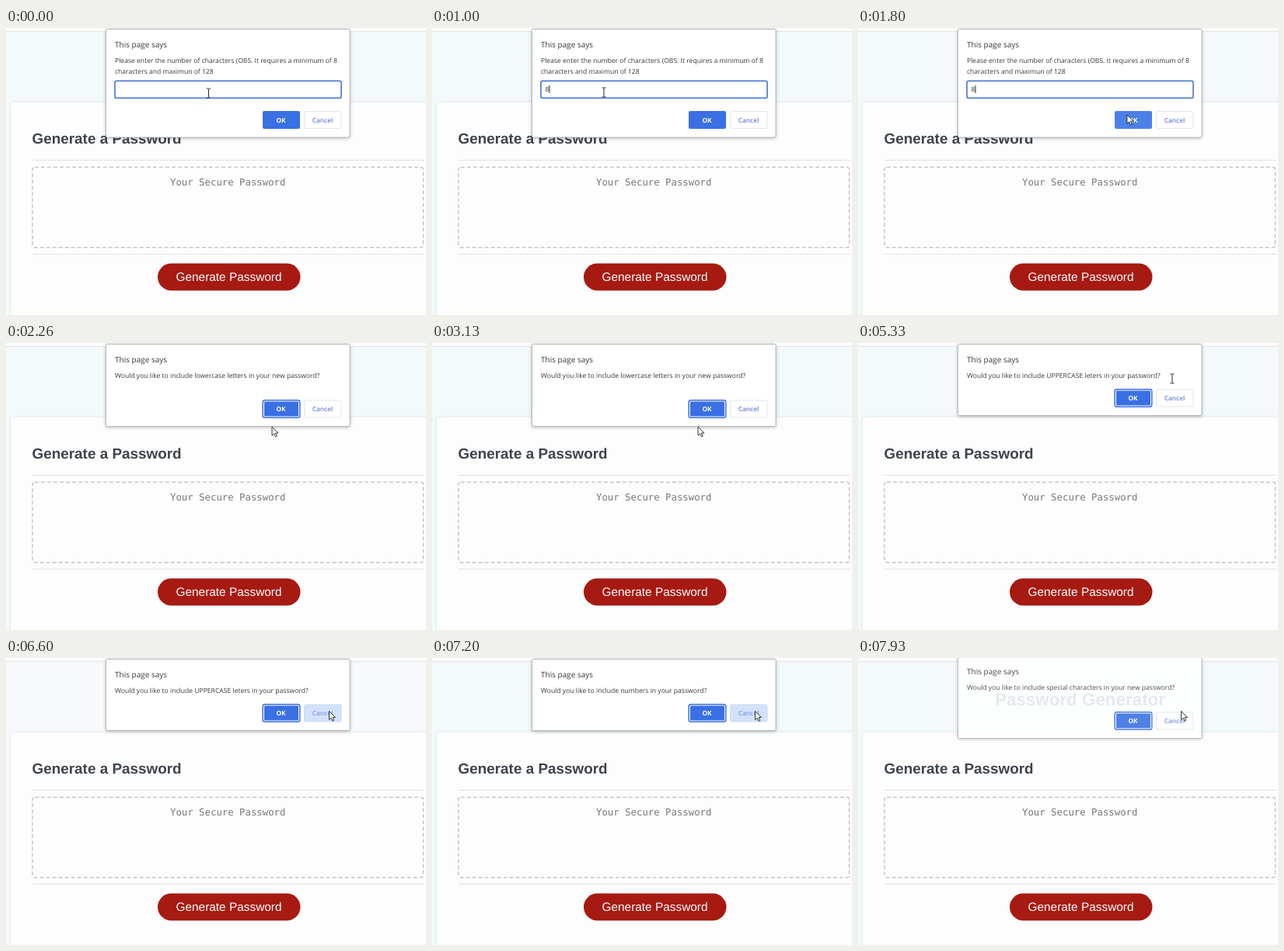
Recreate the animation shown at these times as an HTML page. Size 540x370 px, loop 8 s.

```html
<!DOCTYPE html>
<html lang="en">
<head>
<meta charset="utf-8">
<title>Password generator</title>
<style>
  html, body { margin: 0; width: 100%; height: 100%; overflow: hidden; }
  svg { display: block; width: 540px; height: 370px; font-family: "Liberation Sans", Arial, sans-serif; text-rendering: geometricPrecision; }
  .dialog { font: 8.58px "Open Sans", "Noto Sans", sans-serif; fill: #35383c; }
  .says { font-size: 10px; }
  .label { font-size: 8.3px; font-weight: 600; text-anchor: middle; }
  .panel { fill: #fff; stroke: #b4b8ba; filter: drop-shadow(0 1px 2px rgba(0, 0, 0, .25)); }
  .ok { fill: #3a70e4; }
  .ok.hover { fill: #4b80e8; }
  .ok + text { fill: #fff; font-weight: 700; }
  .ring { fill: #fff; stroke: #3a70e4; stroke-width: 1.5; }
  .cancel { fill: #fff; stroke: #e2e5ea; }
  .cancel.hover { fill: #d3e1fb; stroke: #cbdaf6; }
  .cancel + text { fill: #6a82d6; }
  .cancel.hover + text { fill: #7f9be0; }
</style>
</head>
<body>
<svg viewBox="0 0 540 370">
  <rect id="backdrop" width="540" height="370"/>
  <rect width="540" height="4" fill="#fdfdfd"/>
  <path d="M0 4.5H540" stroke="#e3e4e1"/>
  <text x="176" y="61" font-size="22.4" font-weight="bold" fill="#26405e">Password Generator</text>
  <rect x="6" y="96" width="560" height="300" rx="4" fill="#fdfdfd" style="filter:drop-shadow(0 0 2px rgba(60,90,100,.14))"/>
  <text x="33.5" y="149" font-size="18.9" font-weight="bold" fill="#3d444b">Generate a Password</text>
  <path d="M34 170.5H538M34 291.5H538" stroke="#e1e1e3"/>
  <rect x="34" y="179.5" width="502.5" height="103.5" rx="3" fill="none" stroke="#c5c5ca" stroke-width="1.5" stroke-dasharray="5 3"/>
  <text x="211" y="203" font-size="12.33" fill="#777" style="font-family:'DejaVu Sans Mono',monospace">Your Secure Password</text>
  <rect x="195" y="303.5" width="183.5" height="35" rx="17.5" fill="#a61a12"/>
  <text x="218.5" y="326" font-size="15.4" fill="#fff">Generate Password</text>
  <g id="dialogs"></g>
  <path id="arrow" d="M0 0V11.2L2.6 8.8L4.4 12.8L6.2 12L4.5 8.1H8Z" fill="#fff" stroke="#222" stroke-width=".9"/>
  <path id="beam" d="M-2.5 -6H-.7L0 -5.4L.7 -6H2.5M0 -5.4V5.4M-2.5 6H-.7L0 5.4L.7 6H2.5" fill="none" stroke="#222"/>
</svg>
<script>
const LOOP = 8000, TYPED = 700, FADE = 200, SLIDE = 11.4;
const $ = id => document.getElementById(id);

const dialogs = [
  { open: -FADE, close: 1900, bottom: 141, prompt: true,
    lines: ["Please enter the number of characters (OBS. It requires a minimum of 8", "characters and maximun of 128"] },
  { open: 2000, close: 4500, bottom: 107.5,
    lines: ["Would you like to include lowercase letters in your new password?"] },
  { open: 4620, close: 6850, bottom: 93.5,
    lines: ["Would you like to include UPPERCASE leters in your password?"] },
  { open: 6950, close: 7680, bottom: 93.5,
    lines: ["Would you like to include numbers in your password?"] },
  { open: 7800, close: LOOP, bottom: 107.5,
    lines: ["Would you like to include special characters in your new password?"] }
];

// Pointer hot spot: time, x, y
const pointerPath = [
  [0, 260.5, 84], [200, 260.5, 84], [900, 221, 83], [1150, 221, 83], [1700, 346, 112],
  [1900, 346, 112], [2150, 342, 108], [3450, 342, 108], [3900, 348, 86], [4550, 348, 86],
  [5150, 404, 46], [5400, 404, 46], [5950, 415.5, 68.5], [LOOP, 415.5, 68.5]
];

const field = `
  <rect x="140" y="68.2" width="291" height="22" rx="2" fill="#fff" stroke="#4273cd" stroke-width="1.6"/>
  <text id="typed" x="145.5" y="82">8</text>
  <path id="caret" d="M151 74V84" stroke="#222"/>`;

for (const d of dialogs) {
  d.buttonY = d.bottom - 22.5;
  const y = d.buttonY;
  const okButton = d.prompt
    ? `<rect class="ok" x="330" y="${y - 11.5}" width="48" height="23" rx="2"/>`
    : `<rect class="ring" x="330.2" y="${y - 11.3}" width="47.6" height="22.6" rx="2.5"/>
       <rect class="ok" x="332" y="${y - 9.5}" width="44" height="19" rx="1"/>`;
  d.node = document.createElementNS("http://www.w3.org/2000/svg", "g");
  d.node.setAttribute("class", "dialog");
  d.node.innerHTML = `
    <rect class="panel" x="128.5" y="1.5" width="313.5" height="${d.bottom - 1.5}" rx="2"/>
    <text class="says" x="140" y="25">This page says</text>
    ${d.lines.map((line, i) => `<text x="140" y="${45 + 14 * i}">${line}</text>`).join("")}
    ${d.prompt ? field : ""}
    ${okButton}
    <text class="label" x="353.5" y="${y + 3}">OK</text>
    <rect class="cancel" x="383.5" y="${y - 11}" width="47.5" height="22" rx="2"/>
    <text class="label" x="407" y="${y + 3}">Cancel</text>`;
  $("dialogs").append(d.node);
}

const show = (node, on) => node.style.display = on ? "" : "none";
const inside = (x, y, left, right, top, bottom) => x >= left && x <= right && y >= top && y <= bottom;

function pointerAt(t) {
  const i = pointerPath.findIndex(p => p[0] > t);
  const [t0, x0, y0] = pointerPath[i - 1], [t1, x1, y1] = pointerPath[i];
  const p = (t - t0) / (t1 - t0), e = p * p * (3 - 2 * p);
  return [x0 + (x1 - x0) * e, y0 + (y1 - y0) * e];
}

function draw(t) {
  const [x, y] = pointerAt(t);
  let overText = false;
  for (const d of dialogs) {
    const active = t >= d.open && t < d.close;
    show(d.node, active);
    if (!active) continue;
    const left = 1 - Math.min(1, (t - d.open) / FADE);
    const shift = -SLIDE * left, by = d.buttonY + shift;
    d.node.setAttribute("opacity", 1 - left * left);
    d.node.setAttribute("transform", `translate(0 ${shift})`);
    d.node.querySelector(".ok").classList.toggle("hover", inside(x, y, 330, 378, by - 11, by + 11));
    d.node.querySelector(".cancel").classList.toggle("hover", inside(x, y, 383, 431, by - 11, by + 11));
    overText = inside(x, y, 140, 432, 36, 49) || (d.prompt && inside(x, y, 140, 432, 68, 91));
  }
  show($("typed"), t >= TYPED);
  show($("caret"), t >= TYPED && (t - TYPED) % 1000 < 500);
  show($("beam"), overText);
  show($("arrow"), !overText);
  $(overText ? "beam" : "arrow").setAttribute("transform", `translate(${x} ${y})`);
  $("backdrop").setAttribute("fill", t >= 6400 && t < 7200 ? "#f8f9fa" : "#f4fafb");
}

const start = performance.now();
function tick() {
  draw((performance.now() - start) % LOOP);
  requestAnimationFrame(tick);
}
tick();
</script>
</body>
</html>
```
